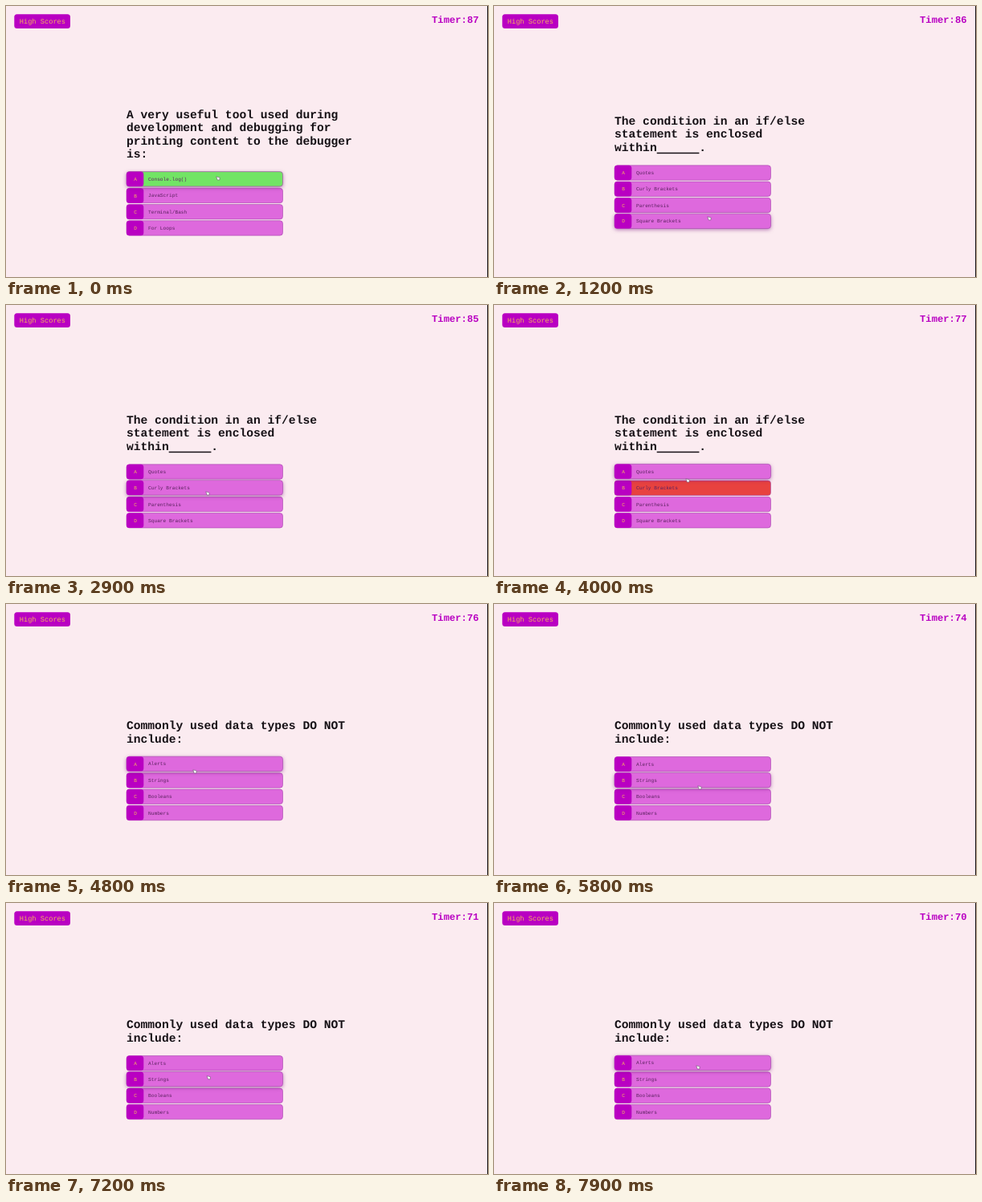
Recreate the animation shown at these times as an HTML page with a canvas. Size 600 px wide and 338 px high, loop 8000 ms.

```html
<!DOCTYPE html>
<html>
<head>
<meta charset="utf-8">
<style>
html, body { margin: 0; width: 100%; height: 100%; overflow: hidden; background: #fbebf0; }
canvas { display: block; }
</style>
</head>
<body>
<canvas id="stage" width="600" height="338"></canvas>
<script>
const ctx = document.getElementById('stage').getContext('2d');
const LOOP = 8000, FEEDBACK = 500, MISS = 3650;
const LEFT = 150, PITCH = 20.25, ROW = 18.4, LINE = 16.4;
const PURPLE = '#b900c2', PINK = '#de69dd', GREEN = '#72e465', RED = '#e8423f', GOLD = '#f3b35f';

// Each question stays until its picked answer has shown feedback
const questions = [
  { title: ['A very useful tool used during', 'development and debugging for', 'printing content to the debugger', 'is:'],
    choices: ['Console.log()', 'JavaScript', 'Terminal/Bash', 'For Loops'],
    click: 0, pick: 0, color: GREEN },
  { title: ['The condition in an if/else', 'statement is enclosed', 'within______.'],
    choices: ['Quotes', 'Curly Brackets', 'Parenthesis', 'Square Brackets'],
    click: MISS, pick: 1, color: RED },
  { title: ['Commonly used data types DO NOT', 'include:'],
    choices: ['Alerts', 'Strings', 'Booleans', 'Numbers'],
    click: Infinity }
];

// Pointer stops
const stops = [
  { t: 500, x: 264, y: 215 },
  { t: 1200, x: 268, y: 265 },
  { t: 2900, x: 251, y: 235 },
  { t: 4800, x: 235, y: 209 },
  { t: 5800, x: 256, y: 229 },
  { t: 6600, x: 251, y: 228 },
  { t: 7900, x: 254, y: 205 }
];

// A wrong answer costs extra seconds
const secondsAt = t => t < MISS
  ? 87 - Math.floor((t + 900) / 1600)
  : 78 - Math.floor((t - MISS + 400) / 550);

function pointerAt(t) {
  const next = stops.findIndex(s => s.t > t);
  if (next < 0) return stops[stops.length - 1];
  const b = stops[next], a = stops[next - 1] || b;
  const u = a === b ? 0 : (t - a.t) / (b.t - a.t);
  const e = u * u * (3 - 2 * u);
  return { x: a.x + (b.x - a.x) * e, y: a.y + (b.y - a.y) * e };
}

function text(str, x, y, size, color, weight = '', align = 'left') {
  ctx.font = `${weight} ${size}px "Courier New", "Liberation Mono", monospace`;
  ctx.textRendering = 'geometricPrecision';
  ctx.textAlign = align;
  ctx.fillStyle = color;
  ctx.fillText(str, x, y);
}

function box(x, y, w, h, color) {
  ctx.beginPath();
  ctx.roundRect(x, y, w, h, 3.5);
  ctx.fillStyle = color;
  ctx.fill();
}

function titleLine(line, y) {
  const size = 14.64, advance = size * 0.6;
  text(line.replace(/_/g, ' '), LEFT, y, size, '#151015', 'bold');
  // The blank to fill in is one solid rule
  const blank = line.match(/_+/);
  if (blank) ctx.fillRect(LEFT + blank.index * advance, y + 1.9, blank[0].length * advance, 1.5);
}

function choice(label, i, top, hovered, color) {
  const y = top + i * PITCH - (hovered ? 0.4 : 0);
  ctx.save();
  if (hovered) {
    ctx.shadowColor = 'rgba(110, 0, 120, .5)';
    ctx.shadowBlur = 5;
    ctx.shadowOffsetY = 1.5;
  }
  box(LEFT, y, 194.5, ROW, color);
  ctx.restore();
  ctx.lineWidth = 0.6;
  ctx.strokeStyle = '#a544ab';
  ctx.stroke();
  box(LEFT, y, 21.3, ROW, PURPLE);
  text('ABCD'[i], 161, y + 11.3, 6.2, GOLD, '', 'center');
  text(label, 177, y + 11.2, 6.2, '#5c2360');
}

function pointer({ x, y }) {
  ctx.beginPath();
  ctx.moveTo(x - 2.2, y - 2.2);
  ctx.lineTo(x + 2.2, y - 0.9);
  ctx.lineTo(x + 1.8, y + 2);
  ctx.lineTo(x - 0.8, y + 2);
  ctx.closePath();
  ctx.lineWidth = 0.6;
  ctx.strokeStyle = '#6b5570';
  ctx.fillStyle = '#fff';
  ctx.fill();
  ctx.stroke();
}

function draw(t) {
  ctx.fillStyle = '#fbebf0';
  ctx.fillRect(0, 0, 600, 338);
  ctx.fillStyle = '#1c181b';
  ctx.fillRect(599, 0, 1, 338);

  box(10.3, 10.3, 69.7, 17.7, PURPLE);
  text('High Scores', 16.7, 22.2, 8.7, GOLD);
  text('Timer:' + secondsAt(t), 530, 20.5, 12.2, PURPLE, 'bold');

  const { title, choices, click, pick, color } = questions.find(q => t < q.click + FEEDBACK);
  const top = 174.2 + title.length * LINE / 2;
  title.forEach((line, i) => titleLine(line, top - 18 - (title.length - 1 - i) * LINE));

  const hand = pointerAt(t);
  const over = Math.floor((hand.y - top) / PITCH);
  const paint = i =>
    choice(choices[i], i, top, i === over, t >= click && i === pick ? color : PINK);
  choices.forEach((_, i) => { if (i !== over) paint(i); });
  if (choices[over]) paint(over);
  pointer(hand);
}

const start = performance.now();
function tick() {
  draw((performance.now() - start) % LOOP);
  requestAnimationFrame(tick);
}
tick();
</script>
</body>
</html>
```
